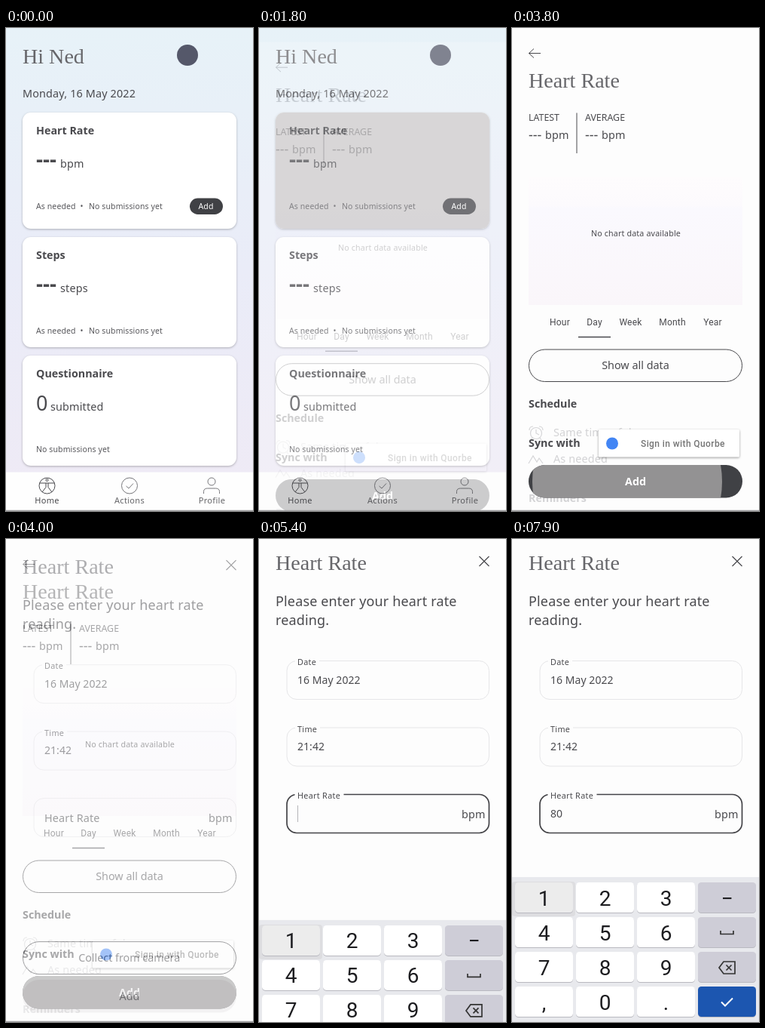
An HTML page for the animation above (8 s loop, 328 px wide and 640 px high).

```html
<!DOCTYPE html>
<html lang="en">
<head>
<meta charset="utf-8">
<title>Heart rate entry</title>
<style>
html, body { margin: 0; width: 100%; height: 100%; overflow: hidden; background: #fdfdfd; }
svg { display: block; width: 328px; height: 640px; }
text { font: 14.4px "Noto Sans", "Open Sans", sans-serif; letter-spacing: .15px; fill: #4a4a4e; white-space: pre; }
.title { font: 28.1px "Liberation Serif", serif; letter-spacing: 0; fill: #66666a; }
.bold { font-size: 14.3px; font-weight: 600; letter-spacing: 0; }
.medium { font-weight: 500; letter-spacing: 0; }
.dash { font-size: 28px; font-weight: 600; letter-spacing: 0; }
.dash2 { font-size: 18px; letter-spacing: 0; }
.zero { font-size: 27px; }
.note { font-size: 10.5px; letter-spacing: .1px; fill: #58585c; }
.nav { font-size: 11px; letter-spacing: .3px; }
.caps { font-size: 12.4px; letter-spacing: 0; }
.tab { font: 12px Roboto, sans-serif; letter-spacing: .2px; }
.lead { font-size: 18px; }
.label { font-size: 10.8px; letter-spacing: .3px; }
.value { font-size: 14px; letter-spacing: .05px; }
.pale { fill: #d3d3d5; }
.white { fill: #fff; }
.mid { text-anchor: middle; }
.key { font: 28px Roboto, sans-serif; letter-spacing: 0; fill: #1d1d20; text-anchor: middle; }
.line { fill: none; stroke: #48484c; stroke-width: 1; }
.soft { stroke: #77777b; }
.paleLine { fill: none; stroke: #d6d6d8; stroke-width: 1.2; }
.field { fill: none; stroke: #e6e6e8; stroke-width: 1; }
.card { fill: #fff; filter: drop-shadow(0 1.5px 1.5px #0004); }
</style>
</head>
<body>
<svg viewBox="0 0 328 640">
  <defs>
    <linearGradient id="sky" x2="0" y2="1">
      <stop stop-color="#e7f2f8"/><stop offset=".5" stop-color="#eaecf8"/><stop offset="1" stop-color="#efeaf5"/>
    </linearGradient>
    <linearGradient id="chart" x2="0" y2="1">
      <stop stop-color="#fefcfd"/><stop offset=".22" stop-color="#fcfafd"/>
      <stop offset=".24" stop-color="#faf9fe"/><stop offset="1" stop-color="#faf6fa"/>
    </linearGradient>
    <clipPath id="cardClip"><rect x="22" y="112" width="284" height="154" rx="11"/></clipPath>
    <clipPath id="addClip"><rect x="22" y="579" width="284" height="43.5" rx="21.7"/></clipPath>
  </defs>

  <g id="home">
    <rect width="328" height="640" fill="url(#sky)"/>
    <text class="title" x="22" y="47">Hi Ned</text>
    <circle cx="241" cy="36" r="14" fill="#55586a"/>
    <text x="22" y="92">Monday, 16 May 2022</text>
    <rect class="card" x="22" y="112" width="284" height="154" rx="11"/>
    <rect class="card" x="22" y="277" width="284" height="146" rx="11"/>
    <rect class="card" x="22" y="434" width="284" height="146" rx="11"/>
    <circle id="cardRipple" cx="134" cy="190" fill="#cbc9ca" clip-path="url(#cardClip)"/>

    <text class="bold" x="40" y="141">Heart Rate</text>
    <text class="dash" x="40" y="184">---</text><text x="72" y="185">bpm</text>
    <text class="note" x="40" y="240">As needed</text><text class="note" x="98.5" y="240">•</text>
    <text class="note" x="110" y="240">No submissions yet</text>
    <rect x="244" y="225.5" width="44" height="21.5" rx="10.7" fill="#404145"/>
    <text class="note medium mid" style="fill:#fff" x="265.5" y="240">Add</text>

    <text class="bold" x="40" y="306">Steps</text>
    <text class="dash" x="40" y="349">---</text><text x="72" y="350">steps</text>
    <text class="note" x="40" y="405">As needed</text><text class="note" x="98.5" y="405">•</text>
    <text class="note" x="110" y="405">No submissions yet</text>

    <text class="bold" x="40" y="463">Questionnaire</text>
    <text class="zero" x="40" y="507">0</text><text x="59" y="507">submitted</text>
    <text class="note" x="40" y="562">No submissions yet</text>

    <rect y="588.5" width="328" height="52" fill="#fefefe"/>
    <g class="line">
      <circle cx="54.5" cy="606.5" r="10.5"/>
      <circle cx="54.5" cy="599" r="1.5"/>
      <path d="M44.5 603H64.5M53 603V608.5L48 615M56 603V608.5L61 615"/>
      <circle class="soft" cx="164" cy="606.5" r="10.5"/>
      <path class="soft" d="M159.5 607l3.5 3 6-6.5"/>
      <circle class="soft" cx="273" cy="601" r="5"/>
      <path class="soft" d="M262.5 617V614.5q0-4.5 5-4.5H278.500q5 0 5 4.5V617"/>
    </g>
    <text class="nav medium mid" x="54.5" y="630">Home</text>
    <text class="nav mid" x="164" y="630" fill-opacity=".85">Actions</text>
    <text class="nav mid" x="273.5" y="630" fill-opacity=".85">Profile</text>
  </g>

  <g id="detail">
    <rect width="328" height="720" fill="#fdfdfd"/>
    <path class="line" d="M38 33.5H22.5M29 27.5L22.5 33.5L29 39.5"/>
    <text class="title" x="22" y="79">Heart Rate</text>
    <text class="caps" x="22" y="123">LATEST</text><text class="caps" x="97" y="123">AVERAGE</text>
    <text class="dash2" x="22" y="148">---</text><text x="44" y="147">bpm</text>
    <text class="dash2" x="97" y="148">---</text><text x="119" y="147">bpm</text>
    <path class="line" d="M86 112.5V166"/>
    <rect x="22" y="198" width="284" height="169" fill="url(#chart)"/>
    <text class="mid" style="font-size:10.7px" x="164.5" y="276">No chart data available</text>
    <g class="mid">
      <text class="tab" x="63.5" y="394">Hour</text><text class="tab" x="109.5" y="394">Day</text>
      <text class="tab" x="157.5" y="394">Week</text><text class="tab" x="213" y="394">Month</text>
      <text class="tab" x="266.5" y="394">Year</text>
    </g>
    <path class="line" style="stroke-width:1.6" d="M88 409.5H131"/>
    <rect class="line" x="22.5" y="426" width="283" height="42.5" rx="21.2"/>
    <text class="medium mid" x="164" y="452">Show all data</text>
    <text class="bold" x="22" y="503">Schedule</text>
    <g class="paleLine">
      <circle cx="32" cy="537" r="7.5"/>
      <path d="M32 532V537L36 539M23 533q0-5 5-5M41 533q0-5-5-5M27 543l-2 3M37 543l2 3"/>
      <path d="M22 577L28 567L33 575L36 570L41 577"/>
    </g>
    <text class="pale" x="55" y="541">Same time of day</text>
    <text class="pale" x="55" y="576">As needed</text>
    <text class="pale bold" x="22" y="628">Reminders</text>
    <text class="bold" x="22" y="555">Sync with</text>
    <rect x="115" y="532" width="187" height="36.5" rx="1.5" fill="#fff" style="filter:drop-shadow(0 1px 1.5px #0006)"/>
    <circle cx="133" cy="550.5" r="8" fill="#4285f4"/>
    <text x="171" y="555" style="font:500 12px Roboto,sans-serif;letter-spacing:.4px;fill:#757575">Sign in with Quorbe</text>
    <g clip-path="url(#addClip)">
      <rect x="22" y="579" width="284" height="44" fill="#404145"/>
      <circle id="addRipple" cx="153" cy="601" fill="#939293"/>
    </g>
    <text class="bold mid white" x="164" y="606">Add</text>
  </g>

  <g id="form">
    <rect width="328" height="720" fill="#fdfdfd"/>
    <text class="title" x="22" y="41">Heart Rate</text>
    <path class="line" style="stroke-width:1.2" d="M292.5 23L305.5 36M305.5 23L292.5 36"/>
    <text class="lead" x="22" y="88.5">Please enter your heart rate</text>
    <text class="lead" x="22" y="113.5">reading.</text>
    <rect class="field" x="37" y="161.5" width="268.5" height="51" rx="13"/>
    <rect x="48" y="158" width="32" height="6" fill="#fdfdfd"/>
    <text class="label" x="51" y="166.5">Date</text><text class="value" x="51" y="192">16 May 2022</text>
    <rect class="field" x="37" y="250" width="268.5" height="51" rx="13"/>
    <rect x="48" y="247" width="33" height="6" fill="#fdfdfd"/>
    <text class="label" x="51" y="255.5">Time</text><text class="value" x="51" y="280">21:42</text>
    <rect id="entry" class="field" x="37" y="338.5" width="268.5" height="51" rx="13"/>
    <rect id="notch" x="47.5" y="335" width="65" height="6" fill="#fdfdfd"/>
    <text id="entryLabel" x="51">Heart Rate</text>
    <text id="entryValue" class="value" x="51" y="369"/>
    <rect id="cursor" y="353" width="1" height="22" fill="#b5b5b8"/>
    <text x="269" y="370">bpm</text>
    <rect class="line" x="22.5" y="528.5" width="283" height="43" rx="21.5"/>
    <text class="medium mid" style="font-size:14.3px" x="163.7" y="554.5">Collect from camera</text>
    <rect x="22" y="579" width="284" height="43.5" rx="21.7" fill="#ebe9ea"/>
    <text class="medium mid" x="164" y="606">Add</text>
  </g>

  <path d="M0 639.3H328" stroke="#a2a2a4" stroke-width="1.2"/>
  <g id="keyboard"></g>
</svg>
<script>
const $ = id => document.getElementById(id);
const LOOP = 8000, STEP = 100;
const clamp = v => Math.max(0, Math.min(1, v));
const easeOut = p => 1 - (1 - p) ** 3;
const progress = (t, start, length) => clamp((t - start) / length);

const keys = ['1', '2', '3', '−', '4', '5', '6', 'space', '7', '8', '9', 'del', ',', '0', '.', 'ok'];
const icons = {
  space: '<path d="M277 519v4.5h17v-4.5" fill="none" stroke="#333" stroke-width="1.7"/>',
  del: '<path d="M281 560h15v16h-15l-6-8zM284.5 564.5l7 7m0-7l-7 7" fill="none" stroke="#333" stroke-width="1.7"/>',
  ok: '<path d="M278 613.5l5 5 10-10" fill="none" stroke="#fff" stroke-width="2"/>'
};
const keyFill = (key, col) => key === 'ok' ? '#2370de' : key === '1' ? '#ececec' : col === 3 ? '#cecdd7' : '#fff';

$('keyboard').innerHTML = '<rect y="448" width="328" height="192" fill="#e8e9ed"/>' +
  '<rect y="454" width="84" height="46" rx="4" fill="#dddde0"/>' +
  keys.map((key, i) => {
    const col = i % 4, x = 4 + col * 81, y = 455 + (i >> 2) * 46;
    const face = icons[key] || `<text class="key" x="${x + 38.5}" y="${y + 30.5}">${key}</text>`;
    return `<rect x="${x}" y="${y + 1}" width="77" height="40" rx="4.5" fill="#b9b9c0"/>
      <rect id="key${i}" x="${x}" y="${y}" width="77" height="40" rx="4.5" fill="${keyFill(key, col)}"/>${face}`;
  }).join('');

function press(index, down, colour) {
  $('key' + index).style.fill = down ? colour : '';
}

// A new screen rises a little while it fades in.
function enter(id, t, start) {
  const p = progress(t, start, 500);
  $(id).setAttribute('opacity', clamp(p * 1.3));
  $(id).setAttribute('transform', `translate(0 ${51 * (1 - easeOut(p)) ** 1.5})`);
}

function ripple(id, t, start, radius) {
  $(id).setAttribute('r', t < start ? 0 : radius + (t - start) * .6);
}

function draw(t) {
  ripple('cardRipple', t, 1600, 145);
  ripple('addRipple', t, 3800, 126);
  enter('detail', t, 1700);
  enter('form', t, 3800);

  const focus = t >= 5200, lift = easeOut(progress(t, 5200, 200));
  $('entry').style.stroke = focus ? '#434347' : '';
  $('entry').style.strokeWidth = focus ? 1.7 : '';
  $('notch').setAttribute('opacity', lift);
  const label = $('entryLabel');
  label.setAttribute('y', 370 - 26 * lift);
  label.style.fontSize = 14.4 - 3.6 * lift + 'px';
  label.style.letterSpacing = .15 + .15 * lift + 'px';

  const typed = t < 7200 ? '' : t < 7300 ? '8' : '80';
  $('entryValue').textContent = typed;
  const blink = t < 7400 ? Math.floor((t - 5200) / 500) % 2 === 0 : t < 7900;
  $('cursor').setAttribute('x', 51 + 8 * typed.length);
  $('cursor').setAttribute('opacity', +(focus && blink));

  const rise = easeOut(progress(t, 5250, 450));
  $('keyboard').setAttribute('transform', `translate(0 ${192 * (1 - rise)})`);
  press(9, t >= 7200 && t < 7300, '#dddde0');
  press(13, t >= 7300 && t < 7400, '#dddde0');
  press(15, t >= 7900, '#1c56b0');
}

function tick() {
  const t = performance.now() % LOOP;
  draw(Math.floor(t / STEP) * STEP);
  requestAnimationFrame(tick);
}
tick();
</script>
</body>
</html>
```
